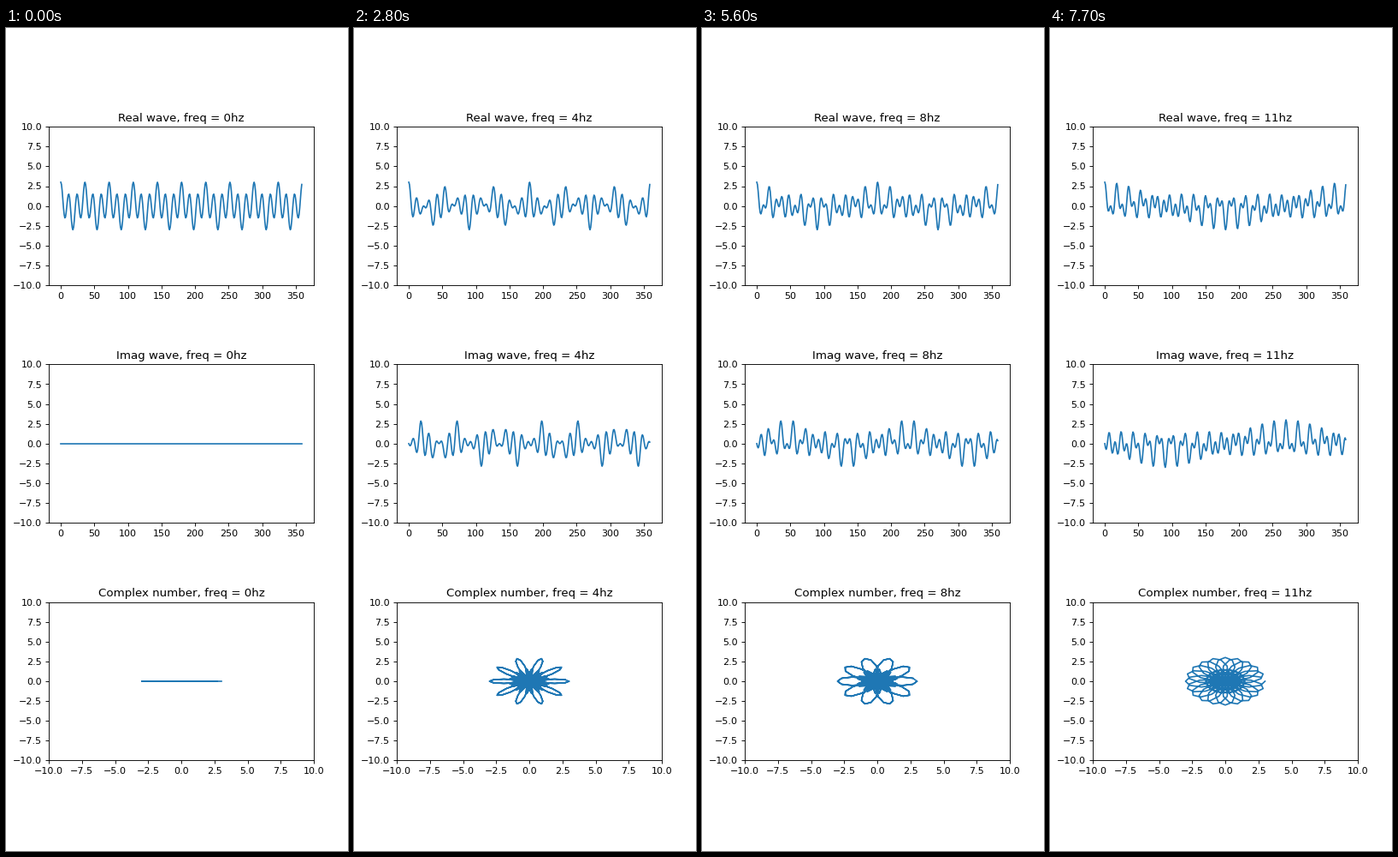
Animation, 400 px wide and 960 px high, one loop 8 s. Source, as a matplotlib script:

```python
import numpy as np
import matplotlib.pyplot as plt
from matplotlib.animation import FuncAnimation

INTERVAL = 100   # ms per frame
FRAMES = 80
HOLD = 7         # frames each frequency stays on screen

deg = np.arange(360)
rad = np.radians(deg)
signal = np.cos(10 * rad) + 2 * np.cos(30 * rad)

fig, axes = plt.subplots(3, 1, figsize=(5, 12), dpi=80)
fig.subplots_adjust(left=0.125, right=0.9, bottom=0.11, top=0.88, hspace=0.5)

names = ("Real wave", "Imag wave", "Complex number")
lines = []
titles = []
for ax, name in zip(axes, names):
    ax.set_ylim(-10, 10)
    ax.set_yticks(np.arange(-10, 10.1, 2.5))
    lines.append(ax.plot([], [], color="#1f77b4", lw=1.5)[0])
    titles.append(ax.set_title(name, fontsize=12))

margin = 0.05 * deg[-1]
for ax in axes[:2]:
    ax.set_xlim(-margin, deg[-1] + margin)
    ax.set_xticks(range(0, 351, 50))
axes[2].set_xlim(-10, 10)
axes[2].set_xticks(np.arange(-10, 10.1, 2.5))


def update(frame):
    freq = frame // HOLD
    wound = signal * np.exp(-1j * freq * rad)
    lines[0].set_data(deg, wound.real)
    lines[1].set_data(deg, wound.imag)
    lines[2].set_data(wound.real, wound.imag)
    for title, name in zip(titles, names):
        title.set_text(f"{name}, freq = {freq}hz")
    return lines + titles


anim = FuncAnimation(fig, update, frames=FRAMES, interval=INTERVAL,
                     init_func=lambda: update(0), repeat=True,
                     repeat_delay=0, blit=False)
plt.show()
```
